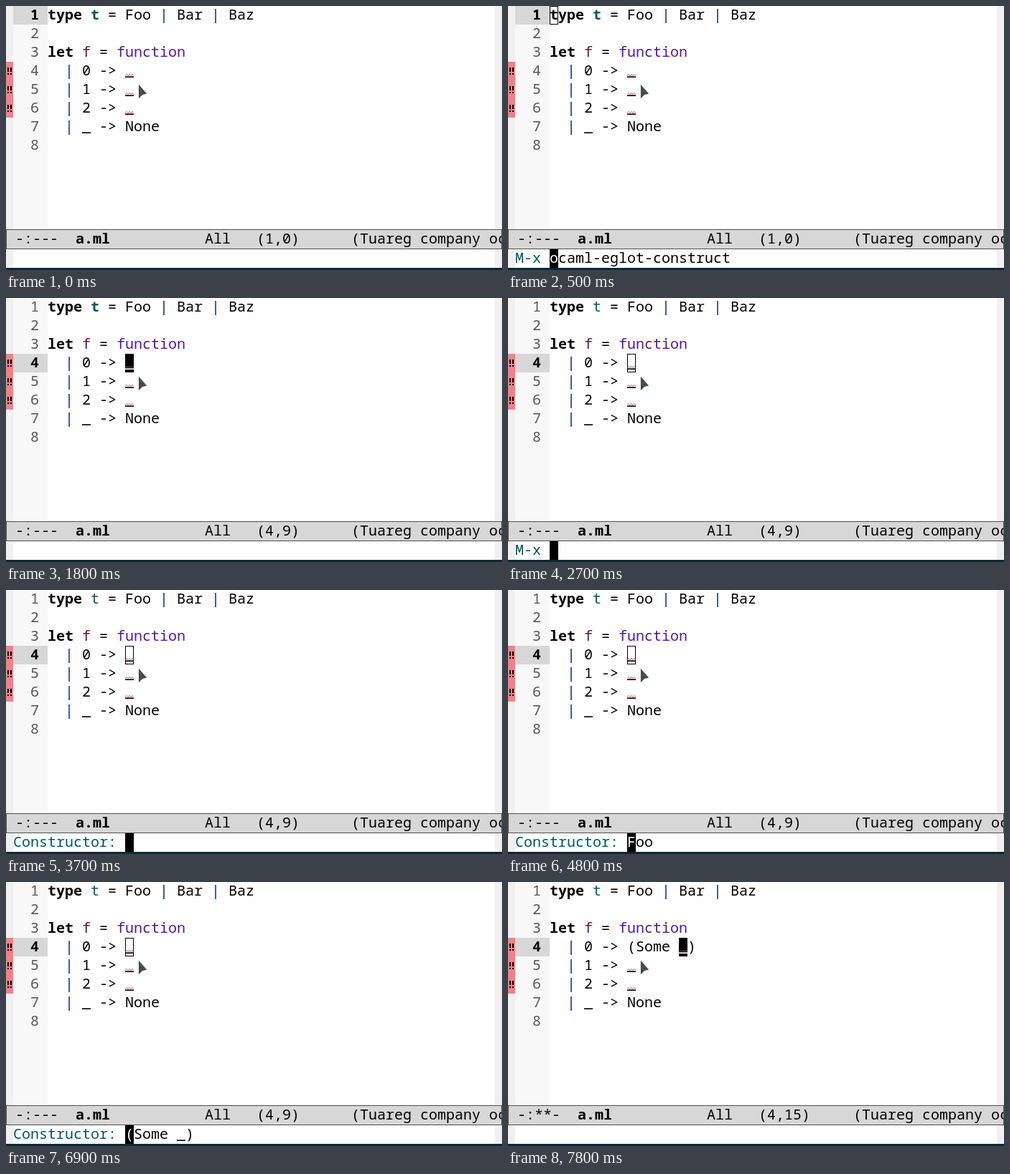
An HTML page with a canvas that plays this animation: 691x369 px, repeating every 8000 ms.

```html
<!DOCTYPE html>
<html>
<head>
<meta charset="utf-8">
<style>
html, body { margin: 0; width: 100%; height: 100%; overflow: hidden; background: #fff; }
canvas { display: block; }
</style>
</head>
<body>
<canvas id="stage" width="691" height="369"></canvas>
<script>
const g = document.getElementById('stage').getContext('2d');
const CELL = 12, ROW = 26, LEFT = 58, MINI = 340, LOOP = 8000;
const BLACK = '#000', TEAL = '#005a5f', NAVY = '#00257a', PURPLE = '#5317ac', MAGENTA = '#721045';

// Each step changes part of the editor state from its time on.
const HOLE = 'ocaml-eglot-hole-next', BUILD = 'ocaml-eglot-construct';
const steps = [
  [0, { row: 0, col: 0, cursor: '', boldType: true, hole: '_', flagged: true, pos: '(1,0)',
        mark: '---', prompt: '', input: '', block: false }],
  [300, { cursor: 'box', prompt: 'M-x ', block: true }],
  [500, { input: BUILD }],
  [1000, { block: false }],
  [1100, { input: HOLE, block: true }],
  [1600, { block: false }],
  [1700, { prompt: '', input: '', row: 3, col: 9, cursor: 'solid' }],
  [1800, { pos: '(4,9)' }],
  [2300, { cursor: '', boldType: false }],
  [2700, { cursor: 'box', prompt: 'M-x ', block: true }],
  [3000, { input: HOLE }],
  [3200, { input: BUILD }],
  [3700, { prompt: 'Constructor: ', input: '' }],
  [4200, { block: false }],
  [4700, { block: true }],
  [4800, { input: 'Foo' }],
  [5300, { block: false }],
  [5600, { input: 'Bar', block: true }],
  [5900, { input: 'None' }],
  [6400, { block: false }],
  [6900, { input: '(Some _)', block: true }],
  [7000, { block: false }],
  [7400, { prompt: '', input: '', hole: '(Some _)', flagged: false, col: 15, cursor: 'solid' }],
  [7500, { pos: '(4,15)', mark: '**-' }],
  [7800, { flagged: true }]
];

function stateAt(t) {
  return Object.assign({}, ...steps.filter(s => s[0] <= t).map(s => s[1]));
}

function rect(x, y, w, h, color) {
  g.fillStyle = color;
  g.fillRect(x, y, w, h);
}

// Draws text cell by cell on the character grid; y is the top of the row.
function put(text, x, y, color = BLACK, bold = false) {
  g.font = (bold ? '700' : '400') + ' 20px "Noto Sans Mono", "DejaVu Sans Mono", monospace';
  g.fillStyle = color;
  [...text].forEach((ch, i) => g.fillText(ch, x + i * CELL, y + 19));
}

function line(row, ...parts) {
  let x = LEFT;
  for (const [text, color, bold] of parts) {
    put(text, x, row * ROW, color, bold);
    x += text.length * CELL;
  }
}

function block(x, y, ch) {
  rect(x, y, CELL, ROW, BLACK);
  put(ch, x, y, '#fff');
}

function wave(col, row) {
  const x = LEFT + col * CELL, y = row * ROW + 19.5;
  g.strokeStyle = '#d8404c';
  g.lineWidth = 1;
  g.beginPath();
  for (let i = 0; i <= CELL; i += 2) g.lineTo(x + i, y - (i % 4 ? 2 : 0));
  g.stroke();
}

function flag(row) {
  const y = row * ROW;
  rect(0, y, 10, ROW, '#f28088');
  for (const x of [2, 6]) {
    rect(x, y + 8, 2, 6, BLACK);
    rect(x, y + 16, 2, 2, BLACK);
  }
}

function pointer() {
  g.beginPath();
  for (const [x, y] of [[185, 110], [185, 129], [190, 124], [196, 122.5]]) g.lineTo(x, y);
  g.closePath();
  g.lineWidth = 1;
  g.strokeStyle = '#d5d8d8';
  g.stroke();
  g.fillStyle = '#464c4c';
  g.fill();
}

function buffer(s) {
  rect(10, 0, 48, 312, '#f8f8f8');
  rect(10, s.row * ROW, 48, ROW, '#d7d7d7');
  for (let i = 0; i < 8; i++)
    put(String(i + 1), 34, i * ROW, i === s.row ? BLACK : '#595959', i === s.row);

  line(0, ['type ', BLACK, true], ['t', TEAL, s.boldType], [' = Foo '], ['|', NAVY], [' Bar '], ['|', NAVY], [' Baz']);
  line(2, ['let ', BLACK, true], ['f', MAGENTA], [' = '], ['function', PURPLE]);
  [['0', s.hole], ['1', '_'], ['2', '_'], ['_', 'None']].forEach(([pattern, body], i) =>
    line(3 + i, ['  '], ['|', NAVY], [` ${pattern} -> ${body}`]));

  const x = LEFT + s.col * CELL, y = s.row * ROW;
  if (s.cursor === 'solid') block(x, y, '_');
  if (s.cursor === 'box') {
    g.strokeStyle = BLACK;
    g.lineWidth = 1;
    g.strokeRect(x + .5, y + .5, CELL - 1, ROW - 1);
  }
  for (const row of [3, 4, 5]) {
    if (row === 3 && !s.flagged) continue;
    flag(row);
    wave(row === 3 && s.hole !== '_' ? 15 : 9, row);
  }
}

function modeLine(s) {
  rect(0, 312, 691, 28, '#505050');
  rect(1, 313, 689, 26, '#d7d7d7');
  g.save();
  g.beginPath();
  g.rect(1, 313, 689, 26);
  g.clip();
  put('-:' + s.mark, 13, 313);
  put('a.ml', 97, 313, BLACK, true);
  put('All', 277, 313);
  put(s.pos, 349, 313);
  put('(Tuareg company oc', 481, 313);
  g.restore();
}

function miniBuffer(s) {
  const x = 10 + s.prompt.length * CELL;
  put(s.prompt, 10, MINI, TEAL);
  put(s.input, x, MINI);
  if (s.block) block(x, MINI, s.input[0] || ' ');
}

function draw(now) {
  const s = stateAt(now % LOOP);
  rect(0, 0, 691, 369, '#fff');
  for (const x of [0, 681]) rect(x, 0, 10, 312, '#f0f0f0');
  buffer(s);
  pointer();
  modeLine(s);
  for (const x of [0, 681]) rect(x, MINI, 10, 26, '#f0f0f0');
  miniBuffer(s);
  rect(0, 366, 691, 3, '#0c2833');
}

const start = performance.now();
function tick() {
  draw(performance.now() - start);
  requestAnimationFrame(tick);
}
tick();
</script>
</body>
</html>
```
